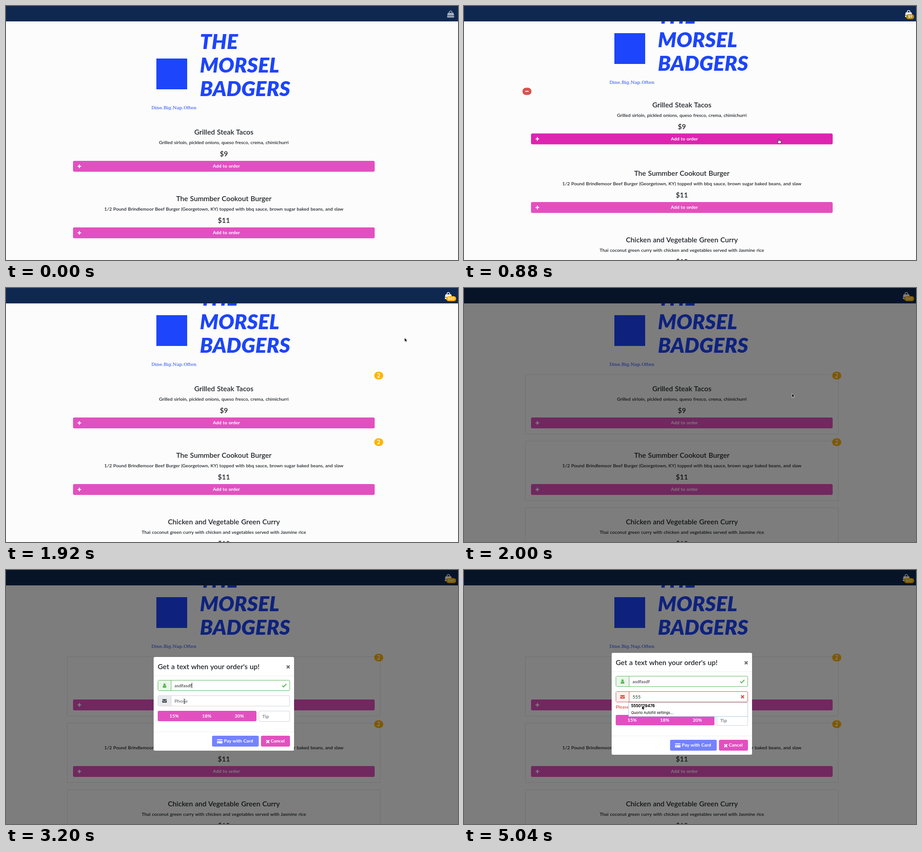
Recreate the animation shown at these times as an HTML page. Size 998 by 561 pixels, loop 5120 ms.

```html
<!DOCTYPE html>
<html lang="en">
<head>
<meta charset="utf-8">
<title>Food order</title>
<style>
  html, body { margin: 0; width: 100%; height: 100%; overflow: hidden; background: #fcfcfc; }
  body { position: relative; font: 600 10.3px/20px Lato, "Open Sans", sans-serif; word-spacing: .06em; color: #212529; }
  div, svg { position: absolute; box-sizing: border-box; white-space: nowrap; }
  svg { fill: currentColor; overflow: visible; }
  #page { inset: 0; }
  .mark { left: 332px; top: 116px; width: 68px; height: 68px; background: #1d45fb; }
  .brand { left: 428px; font: italic 900 46px/50px Lato, sans-serif; color: #1d45fb; }
  .motto { left: 321px; top: 215px; font: 10px/20px "DejaVu Serif", serif; color: #1d45fb; }
  .item { left: 135px; width: 692px; height: 131px; text-align: center; }
  .item > div { left: 0; width: 100%; }
  .item .big { font-size: 15.6px; }
  .item .add { left: 13px; top: 94.5px; width: 666px; height: 23.5px; padding-left: 11px;
    font-weight: 700; line-height: 23.5px; color: #fff; background: #e250c0; border-radius: 3px; }
  .item .add svg { left: 10px; top: 7.5px; }
  .item .hot { background: #dc24b0; }
  .item .ring { box-shadow: 0 0 0 1.5px #ee9bdb; }
  .item .minus { left: -6px; top: -6.5px; width: 20px; height: 15.5px; border-radius: 8px; background: #d9534f; }
  .minus::after { content: ""; position: absolute; left: 6px; top: 6.5px; width: 8px; height: 2.6px; border-radius: 1px; background: #fff; }
  .item .qty { left: 678px; top: -6.5px; width: 19.5px; height: 17px; border-radius: 9px;
    font: 700 12.5px/17px Lato, sans-serif; color: #fff; background: #ffb400; }
  #bar { left: 0; right: 0; top: 0; height: 34px; background: #0f2850; color: #fff; }
  #total { right: 4px; top: 18px; height: 11px; padding: 0 4px; border-radius: 6px; font: 700 8.3px/11px Lato, sans-serif; }
  #shade { inset: 0; background: rgba(0, 0, 0, .5); }
  #shade div { left: 135px; width: 692px; height: 132px; border: 1px solid rgba(0, 0, 0, .1); border-radius: 2px; }
  #modal { left: 326px; width: 310px; background: #fff; border-radius: 3px; }
  #modal .line { left: 0; width: 100%; height: 1px; background: #eceeef; }
  #modal .title { left: 9px; top: 11px; font-size: 15.6px; }
  .field { left: 9px; width: 292px; height: 24px; border: 1px solid #ced4da; border-radius: 3px; color: #464a4c; line-height: 22px; }
  .field .tag { left: 0; top: 0; width: 29px; height: 22px; background: #e9ecef; border-right: 1px solid #ced4da; }
  .field .tag svg { left: 9px; top: 6px; }
  .field .text { left: 36px; top: 0; }
  .field .text i { display: inline-block; vertical-align: -2px; width: 1px; height: 12px; background: #222; }
  .field.focus { border-color: #8fc1ee; }
  .field > svg { right: 6px; top: 6px; display: none; }
  .empty .text { color: #6c757d; }
  .field.good, .good .tag { border-color: #5cb85c; }
  .field.bad, .bad .tag { border-color: #d9534f; }
  .good .tag { background: #eaf6ea; color: #5cb85c; }
  .bad .tag { background: #fdf1f0; color: #d9534f; }
  .good > svg.ok { display: block; color: #5cb85c; }
  .bad > svg.no { display: block; color: #d9534f; }
  #error { left: 9px; top: 109px; color: #d9534f; }
  #foot { left: 0; top: 118.5px; width: 310px; height: 88px; }
  .btn { height: 23.5px; border-radius: 3px; background: #e250c0; color: #fff; font-weight: 700; line-height: 23.5px; }
  .btn span { position: absolute; }
  #list { left: 37px; top: 109px; width: 264px; padding-left: 5px; background: #fff; border: 1px solid #a9cbe6;
    font: 8px/15px Inter, sans-serif; color: #000; word-spacing: 0; }
  #list b { display: block; font-size: 8.5px; }
  #cursor { left: 0; top: 0; }
</style>
</head>
<body>
<div id="page">
  <div class="mark"></div>
  <div class="brand" style="top:53px">THE</div>
  <div class="brand" style="top:105px">MORSEL</div>
  <div class="brand" style="top:157px">BADGERS</div>
  <div class="motto">Dine.Big.Nap.Often</div>
</div>
<div id="bar">
  <svg id="bag" width="16" height="16"><path d="M1.5 5H14L15.5 11H0ZM0 12H15.5V14.5Q15.5 15.5 14.5 15.5H1Q0 15.5 0 14.5Z"/>
    <path d="M4.7 7V4Q4.7 1 7.7 1T10.8 4V7" fill="none" stroke="currentColor" stroke-width="1.4"/></svg>
  <div id="total"></div>
</div>
<div id="shade"><div style="top:191px"></div><div style="top:338px"></div><div style="top:485px"></div></div>
<div id="modal">
  <div class="title">Get a text when your order's up!</div>
  <svg style="left:292.5px;top:17.5px;color:#6b6b6b" width="8" height="8"><path class="cross"/></svg>
  <div class="line" style="top:41px"></div>
  <div class="field" id="name" style="top:51px">
    <div class="tag"><svg width="10" height="10"><circle cx="5" cy="3" r="2.5"/><path d="M1 10V8Q1 5 3 5Q5 6.6 7 5Q9 5 9 8V10Z"/></svg></div>
    <div class="text"></div>
    <svg class="ok" width="11" height="10"><path d="M1 5.2L4 8.2L10 1.6" fill="none" stroke="currentColor" stroke-width="2.2"/></svg>
  </div>
  <div class="field" id="phone" style="top:85px">
    <div class="tag"><svg width="10" height="10"><path d="M0 1.2H10V2.4L5 6L0 2.4ZM0 3.8L5 7.3L10 3.8V9H0Z"/></svg></div>
    <div class="text"></div>
    <svg class="no" style="right:7px;top:7px" width="8" height="8"><path class="cross"/></svg>
  </div>
  <div id="error">Please enter a valid phone number</div>
  <div id="foot">
    <div class="btn" style="left:9px;width:217.5px"><span style="left:26px">15%</span><span style="left:98px">18%</span><span style="left:170px">20%</span></div>
    <div class="field empty" style="left:232px;width:69px"><div class="text" style="left:7px">Tip</div></div>
    <div class="line" style="top:46px"></div>
    <div class="btn" style="left:129px;top:55.5px;width:103px;background:#7482ff">
      <svg style="left:11px;top:7.5px" width="12" height="9"><path d="M0 1Q0 0 1 0H11Q12 0 12 1V2H0ZM0 4H12V8Q12 9 11 9H1Q0 9 0 8ZM1.5 6.5V7.5H5V6.5Z" fill-rule="evenodd"/></svg>
      <span style="left:26px">Pay with Card</span></div>
    <div class="btn" style="left:237px;top:55.5px;width:64px">
      <svg style="left:11px;top:8.5px" width="8" height="8"><path class="cross"/></svg><span style="left:21.5px">Cancel</span></div>
  </div>
  <div id="list"></div>
</div>
<svg id="cursor" width="12" height="14" stroke-linejoin="round">
  <path id="arrow" d="M0 0V8.6L2 6.8L3.4 9.8L4.9 9.1L3.6 6.3H6.2Z" fill="#000" stroke="#fff" stroke-width=".7"/>
  <path id="hand" d="M0 .8Q.9 -.3 1.7 .8V4L5.6 5Q6.5 5.3 6.3 6.5L5.6 10.8H.6L-2.6 6.6Q-2.4 5.2 -1 6L0 6.8Z" fill="#fff" stroke="#222" stroke-width=".9"/>
  <path id="beam" d="M-2 -5Q0 -5 0 -4Q0 -5 2 -5M0 -4V4M-2 5Q0 5 0 4Q0 5 2 5M-1 1.5H1" fill="none" stroke="#222" stroke-width="1"/>
</svg>
<script>
const $ = id => document.getElementById(id);
const LOOP = 5120, STEP = 80;

const menu = [
  ['Grilled Steak Tacos', 'Grilled sirloin, pickled onions, queso fresco, crema, chimichurri', '$9'],
  ['The Summber Cookout Burger', '1/2 Pound Brindlemoor Beef Burger (Georgetown, KY) topped with bbq sauce, brown sugar baked beans, and slaw', '$11'],
  ['Chicken and Vegetable Green Curry', 'Thai coconut green curry with chicken and vegetables served with Jasmine rice', '$10']
];
const cards = menu.map(([name, text, price], i) => {
  const el = document.createElement('div');
  el.className = 'item';
  el.style.top = 247.5 + i * 147.2 + 'px';
  el.innerHTML = `<div class="big" style="top:20px">${name}</div><div style="top:43px">${text}</div>
    <div class="big" style="top:68px">${price}</div>
    <div class="add"><svg width="8" height="8"><path d="M2.9 0H5.1V2.9H8V5.1H5.1V8H2.9V5.1H0V2.9H2.9Z"/></svg>Add to order</div>
    <div class="minus"></div><div class="qty"></div>`;
  $('page').append(el);
  const part = c => el.querySelector(c);
  return { el, add: part('.add'), minus: part('.minus'), qty: part('.qty') };
});
for (const p of document.querySelectorAll('.cross'))
  p.setAttribute('d', 'M1.7 0L4 2.3L6.3 0L8 1.7L5.7 4L8 6.3L6.3 8L4 5.7L1.7 8L0 6.3L2.3 4L0 1.7Z');

// Stepped tracks: [time, value]
const scroll = [[0, 0], [640, 30], [720, 56]];
const hover = [[0, -1], [720, 0], [1120, 1], [1440, 0], [1520, -1]];
const counts = [[[0, 0], [960, 1], [1040, 2]], [[0, 0], [1200, 1], [1280, 2]], [[0, 0]]];
const totals = [[0, ''], [880, '$9'], [1040, '$18'], [1200, '$29'], [1280, '$40']];
const focus = [[0, ''], [2560, 'name'], [3280, 'phone'], [4960, '']];
const shape = [[0, ''], [80, 'arrow'], [720, 'hand'], [1440, 'arrow'], [1760, 'hand'], [1920, 'arrow'], [2480, 'beam'], [5040, 'arrow']];
const word = 'asdfasdf';
const nameLen = [[0, 0], [2720, 1], [2800, 3], [2960, 6], [3040, 8]];
const phoneLen = [[0, 0], [3360, 1], [3440, 3], [3520, 4], [3600, 5], [3680, 7], [3760, 8],
  [3920, 7], [4000, 5], [4080, 3], [4160, 1], [4240, 0]];
const digits = [[0, 0], [4640, 1], [4720, 2], [4800, 3]];
// Pointer path: [time, x, y]
const path = [[80, 281, 440], [240, 689, 296], [640, 689, 296], [720, 694, 293], [1040, 694, 293], [1120, 700, 438],
  [1280, 706, 438], [1360, 721, 303], [1440, 760, 215], [1600, 900, 90], [1760, 978, 18], [1840, 978, 18],
  [1920, 880, 110], [2000, 724, 233], [2320, 480, 262], [2400, 480, 262], [2480, 440, 258], [2640, 400, 256],
  [3120, 400, 256], [3200, 394, 290], [3680, 394, 290], [3760, 399, 290], [4960, 399, 290], [5040, 393, 300]];

const at = (track, t) => track.filter(k => k[0] <= t).pop()[1];
const show = (el, on) => el.style.display = on ? 'block' : 'none';

function point(t) {
  const i = path.findIndex(k => k[0] > t);
  if (i === 0) return [path[0][1], path[0][2]];
  if (i < 0) return path[path.length - 1].slice(1);
  const a = path[i - 1], b = path[i], p = (t - a[0]) / (b[0] - a[0]);
  return [a[1] + (b[1] - a[1]) * p, a[2] + (b[2] - a[2]) * p];
}

function fill(id, text, hint, focused, state) {
  const el = $(id);
  el.className = `field ${text ? '' : 'empty'} ${focused ? 'focus' : ''} ${state}`;
  el.querySelector('.text').innerHTML = (text || hint) + (focused && text ? '<i></i>' : '');
}

function drawShop(t) {
  const over = at(hover, t), total = at(totals, t);
  $('page').style.transform = `translateY(${-at(scroll, t)}px)`;
  cards.forEach((c, i) => {
    const n = at(counts[i], t), on = over === i;
    c.el.style.transform = on ? 'translateY(-4.5px)' : 'none';
    c.add.className = 'add' + (on ? ' hot' : '') + (on && i === 1 && n ? ' ring' : '');
    show(c.minus, on && (n || (i === 0 && t >= 880)));
    show(c.qty, n);
    c.qty.textContent = n;
  });
  show($('total'), total);
  $('total').textContent = total;
  $('total').style.background = t < 960 ? '#b8891f' : '#ffb400';
  $('bag').style.cssText = `left:${total.length > 2 ? 969 : 974}px;top:${total ? 8.5 : 9.5}px;opacity:${total ? 1 : .62}`;
}

function drawModal(t) {
  show($('shade'), t >= 2000);
  show($('modal'), t > 2000);
  const p = Math.min(1, Math.max(0, (t - 2000) / 320));
  const bad = t >= 3360, who = at(focus, t);
  const name = word.slice(0, at(nameLen, t));
  const num = '555'.slice(0, at(digits, t));
  const phone = num || word.slice(0, at(phoneLen, t));
  const m = $('modal').style;
  m.opacity = Math.min(1, p * 2);
  m.transform = `translateY(${-50 * (1 - p) ** 2}px)`;
  m.top = (bad ? 183 : 192) + 'px';
  m.height = (bad ? 225 : 207) + 'px';
  $('foot').style.top = (bad ? 136.5 : 118.5) + 'px';
  show($('error'), bad);
  fill('name', name, 'Name', who === 'name', name ? 'good' : '');
  fill('phone', phone, 'Phone', who === 'phone', bad ? 'bad' : '');
  show($('list'), phone);
  $('list').innerHTML = num ? '<b>5550129476</b>Quorlo Autofill settings...' : '<b>asdfasdfasdf</b>';
}

function drawCursor(t) {
  const kind = at(shape, t), [x, y] = point(t);
  for (const k of ['arrow', 'hand', 'beam']) show($(k), k === kind);
  $('cursor').style.transform = `translate(${x}px, ${y}px)`;
}

const start = performance.now();
let last = -1;
function frame() {
  const t = Math.floor((performance.now() - start) % LOOP / STEP) * STEP;
  if (t !== last) {
    last = t;
    drawShop(t);
    drawModal(t);
    drawCursor(t);
  }
  requestAnimationFrame(frame);
}
frame();
</script>
</body>
</html>
```
